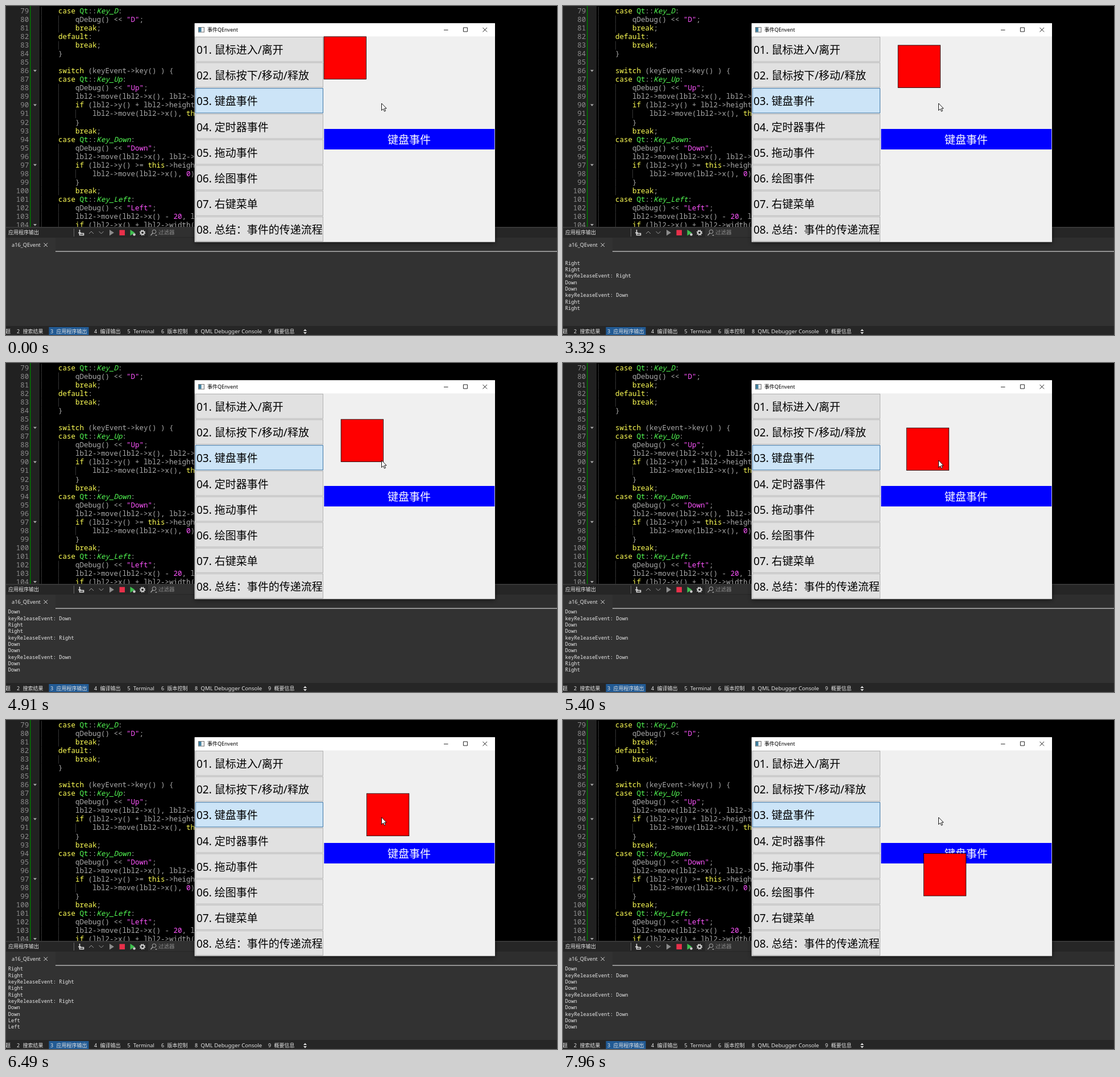
Recreate the animation shown at these times as an HTML page. Size 969 by 578 pixels, loop 8000 ms.

```html
<!DOCTYPE html>
<html lang="zh-CN">
<head>
<meta charset="utf-8">
<title>Key events</title>
<style>
html, body { margin: 0; width: 100%; height: 100%; overflow: hidden; background: #000; }
svg { display: block; }
text { white-space: pre; font-family: "Noto Sans", "Noto Sans CJK SC", "Noto Sans CJK", sans-serif; }
.code text, .log text { font-family: "Noto Sans Mono", monospace; }
.code text { font-size: 12.5px; fill: #aaa; }
.log text { font-size: 8.79px; fill: #e8e8e8; }
.ui text { font-size: 9px; fill: #e4e4e4; }
.kw { fill: #ff5; }
.ns, .en { fill: #5f5; }
.en { font-style: italic; }
.lit { fill: #f5f; }
.big { font-size: 19px; }
</style>
</head>
<body>
<svg width="969" height="578" viewBox="0 0 969 578">
  <defs>
    <filter id="shadow" x="-5%" y="-5%" width="110%" height="112%">
      <feDropShadow dx="0" dy="2" stdDeviation="4" flood-opacity=".5"/>
    </filter>
  </defs>

  <rect width="969" height="578"/>
  <rect width="59" height="389" fill="#212121"/>
  <rect x="42" width="1.5" height="389" fill="#007800"/>
  <g class="code" id="code"></g>

  <g class="ui">
    <rect y="388" width="969" height="190" fill="#323232"/>
    <rect y="388" width="969" height="19" fill="#262626"/>
    <rect y="388.500" width="969" height="1" fill="#484848"/>
    <rect y="407" width="969" height="24" fill="#2e2e2e"/>
    <rect y="407" width="87" height="24" fill="#323232"/>
    <rect x="87" y="430.600" width="882" height="1" fill="#eee"/>
    <text x="4" y="401.300">应用程序输出</text>
    <rect x="119" y="391" width="1" height="14" fill="#666"/>
    <rect x="250" y="389" width="90" height="17" fill="#303030"/>
    <text x="268" y="401.300" style="fill:#8a8a8a;font-size:9.5px">过滤器</text>
    <!-- toolbar icons -->
    <path d="M129.500 393v9.500h7v-3h-7M127 398.500h5" fill="none" stroke="#ddd" stroke-width="1.600"/>
    <path d="M146 400l4-4 4 4M163.500 396l4 4 4-4" fill="none" stroke="#999"/>
    <path d="M182 393v10.500l8-5.200z" fill="#8c8c8c"/>
    <rect x="199.500" y="393.500" width="9.500" height="9.500" fill="#e8304a"/>
    <path d="M218.500 393v10.500l8-5.200z" fill="#3fbf4f"/>
    <circle cx="225.500" cy="401.500" r="2.300" fill="#ccc"/>
    <circle cx="240" cy="398.300" r="2.900" fill="none" stroke="#ddd" stroke-width="1.700"/>
    <circle cx="240" cy="398.300" r="4.400" fill="none" stroke="#ddd" stroke-width="1.500" stroke-dasharray="1.7 1.755"/>
    <circle cx="260.500" cy="396.500" r="3.300" fill="none" stroke="#aaa"/>
    <path d="M258 399l-3.500 4" stroke="#aaa" stroke-width="1.400"/>
    <path d="M262 402h4l-2 2z" fill="#aaa"/>
    <text x="10" y="422.800" style="font-size:9.2px">a16_QEvent</text>
    <path d="M66.500 416.500l6.500 6.500m0-6.500l-6.500 6.500" stroke="#ddd"/>

    <rect y="562" width="969" height="16" fill="#262626"/>
    <rect x="75.500" y="564" width="70" height="14" fill="#215a94"/>
    <g id="tabs"></g>
    <path d="M523 571l3-3.500 3 3.500zM523 573l3 3.500 3-3.500z" fill="#ddd"/>
  </g>
  <g class="log" id="log"></g>

  <rect x="331.800" y="30.400" width="528.200" height="384.200" fill="#f0f0f0" filter="url(#shadow)"/>
  <rect x="331.800" y="30.400" width="528.200" height="23" fill="#fff"/>
  <rect x="338.500" y="37.500" width="10" height="8.500" fill="#eee" stroke="#777"/>
  <rect x="339" y="38" width="4.500" height="7.500" fill="#3f7f9f"/>
  <text x="354" y="45.300" font-size="9">事件QEnvent</text>
  <path d="M770 42.200h7.500M804.400 38h7v7h-7zM838.500 38l7.500 7.500m0-7.500l-7.500 7.500" fill="none" stroke="#000" stroke-width=".85"/>
  <g id="menu"></g>
  <rect x="559.400" y="216" width="299.800" height="36" fill="#00f"/>
  <text class="big" x="709" y="242" fill="#fff" text-anchor="middle">键盘事件</text>
  <rect id="box" width="74.5" height="74.5" fill="#f00" stroke="#000" stroke-width=".8"/>
  <path d="M660.500 171v12.500l3-2.700 2 4.400 2-1-2-4.200h3.700z" fill="#fff" stroke="#000" stroke-width=".9"/>
  <circle id="click" cx="660" cy="171" r="9" fill="#ff0" fill-opacity=".47"/>
</svg>

<script>
const $ = id => document.getElementById(id);
const esc = s => s.replace(/&/g, '&amp;').replace(/</g, '&lt;').replace(/>/g, '&gt;');
const text = (x, y, body, extra = '') => `<text x="${x}" y="${y}" ${extra}>${body}</text>`;

// Code editor
const source = `    case Qt::Key_D:
        qDebug() << "D";
        break;
    default:
        break;
    }

    switch (keyEvent->key() ) {
    case Qt::Key_Up:
        qDebug() << "Up";
        lbl2->move(lbl2->x(), lbl2->y
        if (lbl2->y() + lbl2->height(
            lbl2->move(lbl2->x(), this
        }
        break;
    case Qt::Key_Down:
        qDebug() << "Down";
        lbl2->move(lbl2->x(), lbl2->y
        if (lbl2->y() >= this->height
            lbl2->move(lbl2->x(), 0);
        }
        break;
    case Qt::Key_Left:
        qDebug() << "Left";
        lbl2->move(lbl2->x() - 20, lbl2
        if (lbl2->x() + lbl2->width()`;
const tokens = /(\b(?:case|break|default|switch|if|this)\b)|(\bQt\b)|(Key_\w+)|("\w+"|\b\d+\b)|[^]/g;
const paint = line => line.replace(tokens, (all, kw, ns, en, lit) => {
  const cls = kw ? 'kw' : ns ? 'ns' : en ? 'en' : lit ? 'lit' : '';
  return cls ? `<tspan class="${cls}">${all}</tspan>` : esc(all);
});
const pitch = 15.04;
$('code').innerHTML = source.split('\n').map((line, i) => {
  const y = 13 + i * pitch, n = 79 + i, indent = line.search(/\S/);
  let out = text(40.3, y, n, 'text-anchor="end" style="fill:#8c8c8c"');
  for (let col = 0; col < Math.max(indent, 1); col += 4)
    out += `<rect x="${62 + col * 7.5}" y="${y - 11.5}" width="1" height="${pitch}" fill="#333"/>`;
  if ([86, 90, 97, 104].includes(n))
    out += `<path d="M48 ${y - 6}h6l-3 3.500z" fill="#aaa"/>`;
  return out + (indent < 0 ? '' : text(62 + indent * 7.5, y, paint(line.trim())));
}).join('');

// Bottom pane tabs
$('tabs').innerHTML = text(-1, 574.8, '题') + [
  [19, 2, '搜索结果'], [78, 3, '应用程序输出'], [155, 4, '编译输出'], [213.5, 5, 'Terminal'],
  [273, 6, '版本控制'], [332, 8, 'QML Debugger Console', 9.6], [461, 9, '概要信息']
].map(([x, n, name, size = 9]) =>
  text(x, 574.8, n) + text(x + 10.5, 574.8, name, `style="font-size:${size}px"`)).join('');

// Window buttons
$('menu').innerHTML = ['鼠标进入/离开', '鼠标按下/移动/释放', '键盘事件', '定时器事件', '拖动事件',
  '绘图事件', '右键菜单', '总结：事件的传递流程'].map((name, i) => {
  const y = 54 + i * 45.1;
  const [fill, line] = i === 2 ? ['#cce4f7', '#2d6a9f'] : ['#e1e1e1', '#adadad'];
  return `<rect x="333.3" y="${y + .5}" width="224.2" height="43.2" fill="${fill}" stroke="${line}" stroke-width=".9"/>` +
    text(335, y + 30.2, `0${i + 1}. ${name}`, 'class="big"');
}).join('');

// Key events: capital = press, small letter = release
const keys = ('1650R 1780r 2110D 2310d 3320R 3450r 4180D 4380d 4910D 4980d 5110D 5180d ' +
  '5400R 5600r 5670R 5800r 5880R 5950r 6080R 6150r 6290D 6490L 6560d 6700l 6760D ' +
  '6960d 7030D 7160d 7230D 7360d 7430D 7890d 7890D 7890d 7890D 7960d 7960D')
  .split(' ').map(s => [parseInt(s), s.slice(-1)]);
const names = { R: 'Right', D: 'Down', L: 'Left' };
const moves = { R: [1, 0], D: [0, 1], L: [-1, 0] };
const step = 15.05;
let shown = '';

function draw(t) {
  const lines = [''];
  let col = 0, row = 0;
  for (const [at, key] of keys) {
    if (at > t) break;
    const name = names[key.toUpperCase()];
    if (moves[key]) {
      lines.push(name, name);
      col += moves[key][0];
      row += moves[key][1];
    } else lines.push('keyReleaseEvent: ' + name);
  }
  $('box').setAttribute('x', 559.05 + col * step);
  $('box').setAttribute('y', 53.9 + row * step);
  $('click').style.display = t >= 200 && t < 330 ? '' : 'none';

  const top = lines.length > 10 ? 440.3 : 443.3;
  const log = lines.slice(-10).map((s, i) => text(3.8, top + i * 11.33, s)).join('');
  if (log !== shown) $('log').innerHTML = shown = log;
}

const start = performance.now();
function tick() {
  draw((performance.now() - start) % 8000);
  requestAnimationFrame(tick);
}
tick();
</script>
</body>
</html>
```
